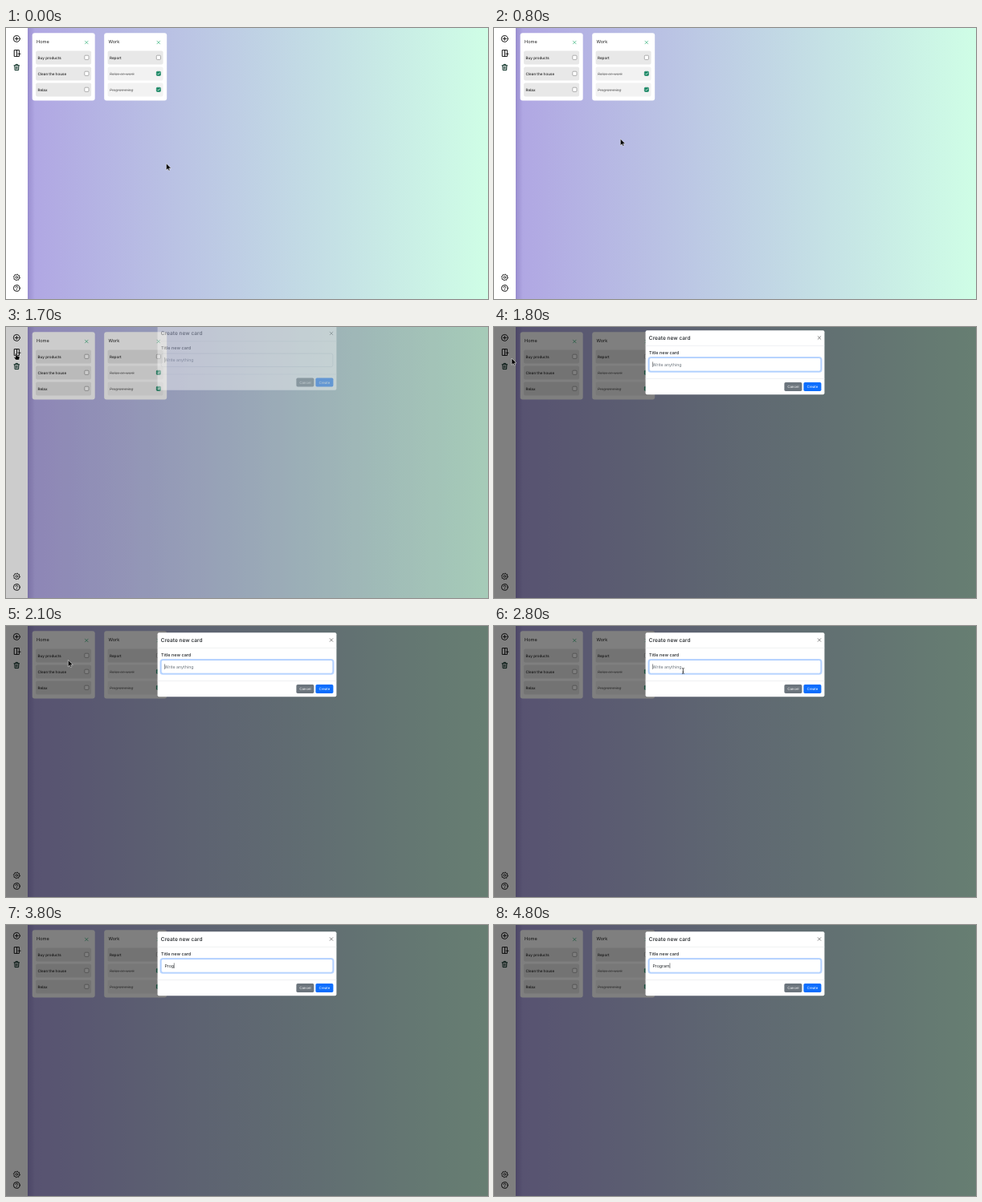
These frames come from a looping animation (600 by 338 pixels, 5 s). An HTML page:

```html
<!DOCTYPE html>
<html lang="en">
<head>
<meta charset="utf-8">
<title>Task board</title>
<style>
  html, body { margin: 0; height: 100%; overflow: hidden; }
  svg { display: block; width: 100%; height: 100%; font-family: Inter, Roboto, sans-serif; text-rendering: geometricPrecision; }
  .icon { fill: none; stroke: #161616; stroke-width: 1; stroke-linecap: round; stroke-linejoin: round; }
  .task { font-size: 4.6px; font-weight: 500; fill: #222; }
  .done { font-weight: 400; font-style: italic; fill: #777; text-decoration: line-through; }
  .button { font-size: 4.4px; fill: #fff; text-anchor: middle; }
</style>
</head>
<body>
<svg viewBox="0 0 600 338" preserveAspectRatio="none">
  <defs>
    <linearGradient id="sky">
      <stop stop-color="#b0a6e3"/>
      <stop offset="1" stop-color="#cffee6"/>
    </linearGradient>
    <linearGradient id="shade">
      <stop stop-color="#403080" stop-opacity=".2"/>
      <stop offset="1" stop-color="#403080" stop-opacity="0"/>
    </linearGradient>
  </defs>
  <rect x="27" width="573" height="338" fill="url(#sky)"/>
  <rect x="27" width="9" height="338" fill="url(#shade)"/>
  <rect width="27" height="338" fill="#fff"/>

  <g class="icon">
    <circle cx="13.3" cy="13.4" r="4"/>
    <path d="M11.3 13.4h4M13.3 11.4v4"/>
    <path d="M16.4 30V27.6H10.2V35.4H16.4V34.4M13.5 27.6V35.4M15 32.2H18M16.5 30.7V33.7"/>
    <path stroke="#12352b" d="M10 46.8H16.6M12 46.6V45.4H14.6V46.6M10.7 47L11 52.6H15.6L15.9 47M12.5 48.6V51M14.1 48.6V51"/>
    <circle cx="13.3" cy="311" r="1.3" stroke-width=".8"/>
    <path id="gear" stroke-width=".9"/>
    <circle cx="13.3" cy="324.5" r="3.9"/>
    <path stroke-width=".9" d="M12 323.6C12 321.6 14.7 321.8 14.6 323.5C14.5 324.4 13.3 324.4 13.3 325.3M13.3 326.6V326.7"/>
  </g>

  <g id="cards"></g>
  <rect id="backdrop" width="600" height="338"/>

  <g id="modal">
    <rect x="188.6" y="8.2" width="222.8" height="80" rx="2" fill="#fff"/>
    <path d="M188.6 27.4H411.4M188.6 68.5H411.4" stroke="#dee2e6" stroke-width=".5"/>
    <text x="192.8" y="20" font-size="6.6" font-weight="500" fill="#212529">Create new card</text>
    <path d="M402.9 15.4L407.1 19.6M407.1 15.4L402.9 19.6" stroke="#555" stroke-width=".7"/>
    <text x="193" y="38" font-size="5.5" font-weight="500" fill="#212529">Title new card</text>
    <rect id="ring" x="192.4" y="41.8" width="215.2" height="18.2" rx="3" fill="none" stroke="#0d6efd" stroke-opacity=".28" stroke-width="1.7"/>
    <rect id="field" x="193.2" y="42.6" width="213.6" height="16.6" rx="2.2" fill="#fff" stroke-width=".6"/>
    <text id="entry" x="197.4" y="52.8" font-size="5.3"></text>
    <path id="caret" stroke="#212529" stroke-width=".5" d="M0 47.4V54"/>
    <rect x="361.4" y="73" width="22" height="11" rx="1.7" fill="#6c757d"/>
    <rect x="385.4" y="73" width="22" height="11" rx="1.7" fill="#0d6efd"/>
    <text class="button" x="372.4" y="80.1">Cancel</text>
    <text class="button" x="396.4" y="80.1">Create</text>
  </g>

  <g id="cursor">
    <path id="arrow" stroke="#fff" stroke-width=".5" d="M0 0V8.3L2 6.5L3.2 9L4.6 8.4L3.4 5.9H6Z"/>
    <path id="hand" stroke="#fff" stroke-width=".4" d="M-.9 .4Q0 -.8 .8 .4V3L3.6 3.7Q4.3 4 4.1 5L3.4 8H-.6L-2.9 4.9Q-2.6 4 -1.7 4.6L-.9 5.2Z"/>
    <path id="beam" fill="none" stroke="#111" stroke-width=".7" d="M-1.4 0Q0 0 0 .8Q0 0 1.4 0M0 .8V6M-1.4 6.8Q0 6.8 0 6Q0 6.8 1.4 6.8M-.8 4.5H.8"/>
  </g>
</svg>
<script>
const el = id => document.getElementById(id);
const set = (id, attrs) => { for (const k in attrs) el(id).setAttribute(k, attrs[k]); };
const clamp = v => Math.min(1, Math.max(0, v));
const smooth = u => u * u * (3 - 2 * u);

function taskRow([label, done], i, x) {
  const y = 28.5 + i * 20;
  return `<rect x="${x + 4.4}" y="${y}" width="69" height="17" rx="2" fill="${done ? '#f2f2f2' : '#e8e8e8'}"/>
    <text class="task ${done ? 'done' : ''}" x="${x + 6.8}" y="${y + 10.2}">${label}</text>
    <rect x="${x + 65.1}" y="${y + 5.7}" width="5.2" height="5.2" rx="1" stroke-width=".6"
      fill="${done ? '#198764' : '#fff'}" stroke="${done ? '#198764' : '#808080'}"/>` +
    (done ? `<path d="M${x + 66.3} ${y + 8.4}l1.1 1.1 2.1-2.4" fill="none" stroke="#fff" stroke-width=".8"/>` : '');
}

function card(x, title, tasks) {
  return `<rect x="${x}" y="6.3" width="78" height="84.2" rx="3" fill="#fff"/>
    <text x="${x + 5.3}" y="18.9" font-size="5.6" fill="#222">${title}</text>
    <path d="M${x + 65.5} 15.9l4.2 4.2m0-4.2l-4.2 4.2" stroke="#4dbb8b" stroke-width=".8"/>` +
    tasks.map((task, i) => taskRow(task, i, x)).join('');
}

el('cards').innerHTML =
  card(32.7, 'Home', [['Buy products'], ['Clean the house'], ['Relax']]) +
  card(122.2, 'Work', [['Report'], ['Relax on work', true], ['Programming', true]]);

// Eight-toothed outline
let gear = '';
for (let i = 0; i < 32; i++) {
  const a = (i + .5) * Math.PI / 16, r = i % 4 < 2 ? 4 : 3.1;
  gear += `${i ? 'L' : 'M'}${13.3 + r * Math.cos(a)} ${311 + r * Math.sin(a)}`;
}
set('gear', { d: gear + 'Z' });

const LOOP = 5000, STEP = 100;
const path = [[0, 199.5, 169], [600, 199.5, 169], [1250, 12.8, 33], [1700, 12.8, 33], [1800, 22, 39], [2700, 235.4, 52.6], [LOOP, 235.4, 52.6]];
const keyTimes = [3200, 3400, 3600, 3800, 4100, 4600, 4800];

function pointer(t) {
  const i = path.findIndex(p => p[0] > t);
  const [t0, x0, y0] = path[i - 1], [t1, x1, y1] = path[i];
  const u = smooth((t - t0) / (t1 - t0));
  return [x0 + (x1 - x0) * u, y0 + (y1 - y0) * u];
}

function draw(t) {
  const fade = clamp((t - 1640) / 150);
  const lift = -22.3 * (1 - clamp((t - 1549) / 437)) ** 2;
  set('backdrop', { opacity: fade / 2 });
  set('modal', { opacity: fade, transform: `translate(0 ${lift})` });

  const focused = t >= 1800;
  set('ring', { visibility: focused ? 'visible' : 'hidden' });
  set('field', { stroke: focused ? '#86b7fe' : '#ced4da' });

  const typed = 'Program'.slice(0, keyTimes.filter(k => k <= t).length);
  el('entry').textContent = typed || 'Write anything';
  set('entry', { fill: typed ? '#212529' : '#6c757d' });
  const width = typed ? el('entry').getComputedTextLength() : 0;
  set('caret', { transform: `translate(${197.6 + width} 0)` });

  const [x, y] = pointer(t);
  const shape = t >= 1200 && t <= 1700 ? 'hand' : focused && x > 193 ? 'beam' : 'arrow';
  for (const id of ['arrow', 'hand', 'beam']) set(id, { display: id === shape ? 'inline' : 'none' });
  set('cursor', { transform: `translate(${x} ${y})`, visibility: t < keyTimes[0] ? 'visible' : 'hidden' });
}

function tick() {
  draw(Math.floor(performance.now() % LOOP / STEP) * STEP);
  requestAnimationFrame(tick);
}
tick();
</script>
</body>
</html>
```
